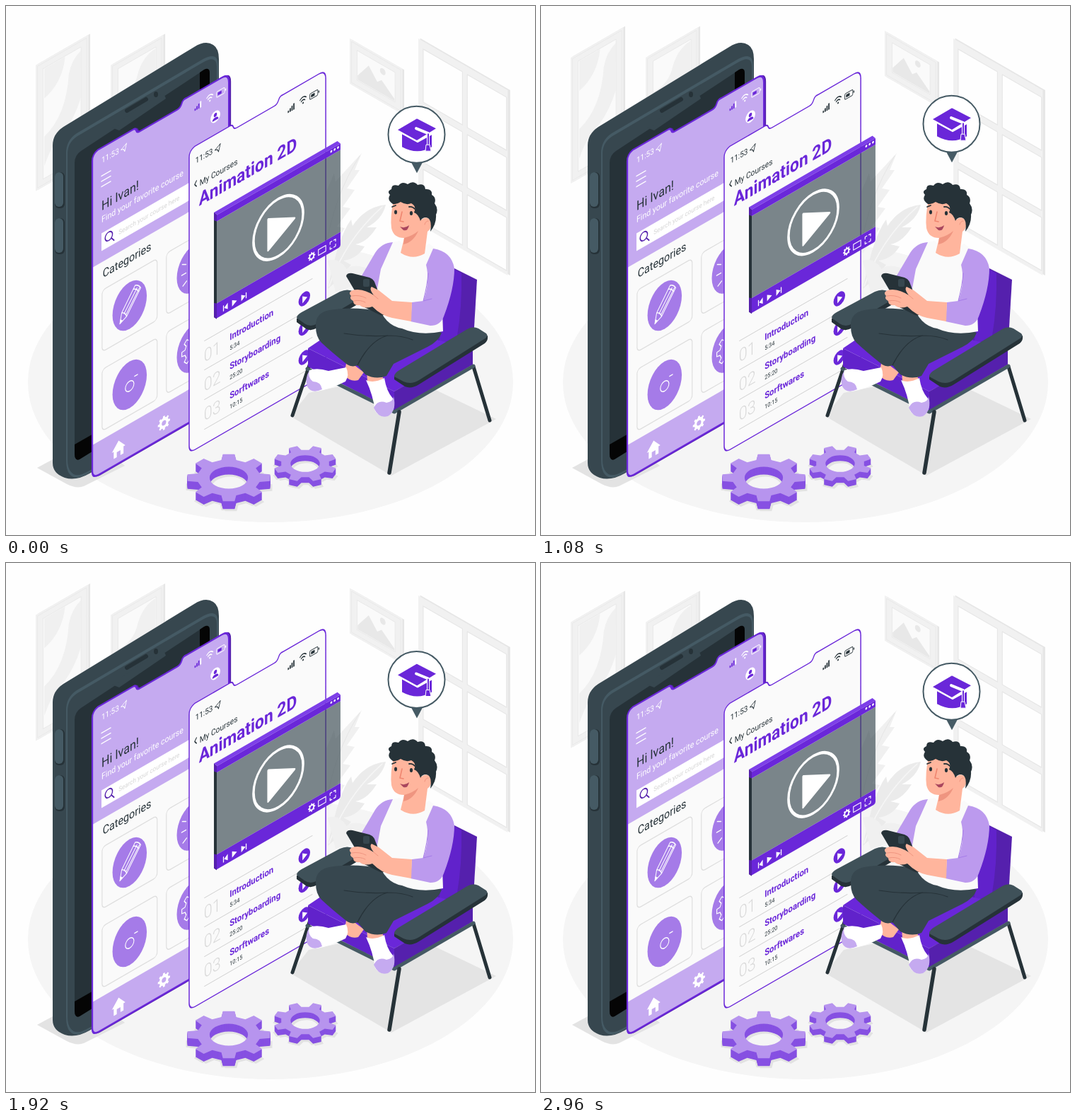
An HTML page for the animation above (3000 ms loop, 748 by 748 pixels).

```html
<!DOCTYPE html>
<html lang="en">
<head>
<meta charset="utf-8">
<style>
  html, body { margin: 0; height: 100%; overflow: hidden; background: #fefefe }
  svg { display: block; width: 100vw; height: 100vh; font-family: Roboto, Inter, sans-serif }
  .line { fill: none; stroke-linecap: round; stroke-linejoin: round }
  .b { font-weight: 700 }
</style>
</head>
<body>
<svg id="stage" viewBox="0 0 748 748"></svg>
<script>
const P = '#6a27d9', LILAC = '#c5aaf0', MID = '#a57be8', DEEP = '#5520ad', SLEEVE = '#bc9aee',
  SLATE = '#37474f', DARK = '#263238', STEEL = '#455a64', SKIN = '#ffb59d', PAPER = '#fafafa';

// Shape helpers
const path = (d, fill, more = '') => `<path d="${d}" fill="${fill}" ${more}/>`;
const line = (d, color, w = 1) => `<path class="line" d="${d}" stroke="${color}" stroke-width="${w}"/>`;
const rect = (x, y, w, h, fill, more = '') =>
  `<rect x="${x}" y="${y}" width="${w}" height="${h}" fill="${fill}" ${more}/>`;
const oval = (x, y, rx, ry, fill, more = '') =>
  `<ellipse cx="${x}" cy="${y}" rx="${rx}" ry="${ry}" fill="${fill}" ${more}/>`;
const text = (x, y, size, fill, s, more = '') =>
  `<text x="${x}" y="${y}" font-size="${size}" fill="${fill}" ${more}>${s}</text>`;
// Wall planes: rising to the right, or falling to the right
const rise = (x, y, s) => `<g transform="matrix(.866 -.5 0 1 ${x} ${y})">${s}</g>`;
const fall = (x, y, s) => `<g transform="matrix(.866 .5 0 1 ${x} ${y})">${s}</g>`;
const part = (id, s) => `<g id="${id}">${s}</g>`;

function gearPath(cx, cy, r, n, hole, squash = 1, turn = 0) {
  const pts = [];
  for (let i = 0; i < n; i++)
    for (const [a, k] of [[-.3, .76], [-.18, 1], [.18, 1], [.3, .76]]) {
      const t = (i + a) / n * 2 * Math.PI + turn;
      pts.push(`${(cx + r * k * Math.cos(t)).toFixed(1)} ${(cy + r * k * squash * Math.sin(t)).toFixed(1)}`);
    }
  const h = r * hole, hy = h * squash;
  return `M${pts.join('L')}ZM${cx - h} ${cy}a${h} ${hy} 0 1 0 ${2 * h} 0a${h} ${hy} 0 1 0 ${-2 * h} 0Z`;
}

function cog(cx, cy, r, depth, turn) {
  const d = gearPath(cx, cy, r, 8, .46, .57, turn);
  const at = (dx, dy, fill) => path(d, fill, `fill-rule="evenodd" transform="translate(${dx} ${dy})"`);
  let s = at(3, depth + 3, '#e2e2e2') + at(-2, depth + 2, '#e2e2e2');
  for (let y = depth; y > 0; y--) s += at(0, y, '#8650e2');
  return s + at(0, 0, '#b794ee');
}

const cardPath = h => `M0 12Q0 3 9 1H67q4 0 5 4t6 4H139q5 0 7-5t7-4H212Q223 0 223 12V${h - 12}` +
  `Q223 ${h} 211 ${h}H10Q0 ${h} 0 ${h - 10}Z`;

function status(x, y, c, c2) {
  let s = '';
  for (let i = 0; i < 4; i++) s += rect(x - 6 + i * 3, y + 2 - i * 2, 2, 3 + i * 2, i < 3 ? c2 : c);
  s += line(`M${x + 14} ${y - 3}q5 -5 10 0M${x + 16} ${y}q3 -3 6 0`, c, 1.5) + oval(x + 19, y + 3, 1.2, 1.2, c);
  return s + rect(x + 30, y - 4, 13, 8, 'none', `rx="1.5" stroke="${c}"`) +
    rect(x + 32, y - 2, 6, 4, c2) + rect(x + 44, y - 1.5, 1.5, 3, c);
}
const clock = (x, y, c) => text(x, y, 11.5, c, '11:53') +
  line(`M${x + 32} ${y - 3}l9 -5l-3 10l-2 -4Z`, c);

const frame = (w, h, art) => rect(3, 0, w, h, '#e6e6e6') + rect(0, 0, w, h, '#f1f1f1') +
  rect(3, 3, w - 6, h - 6, 'none', 'stroke="#e9e9e9"') +
  rect(12, 11, w - 24, h - 22, PAPER, 'stroke="#e8e8e8"') + art;

function room() {
  let panes = '';
  for (const x of [8, 80]) for (const y of [11, 96, 181])
    panes += rect(x, y, 64, 75, '#fefefe', 'stroke="#e6e6e6" stroke-width="1.3"');
  return oval(374, 532, 343, 198, '#f5f5f5') +
    fall(583, 46, rect(3, -2, 147, 262, '#e6e6e6') + rect(0, 0, 146, 262, '#f1f1f1') + panes) +
    part('pictures',
      rise(42, 84, frame(86, 178,
        path('M14 12H48Q44 46 14 54Z M14 108Q50 96 54 40Q58 22 74 16V82Q64 106 46 118Q26 124 14 150Z', '#f0f0f0'))) +
      rise(148, 84, frame(86, 130, path('M13 80V55Q38 56 44 35Q52 14 73 13V66Q50 62 46 85Z', '#f0f0f0'))) +
      fall(486, 46, frame(86, 64,
        path('M13 52V46L31 23L45 39L52 33L73 49V52Z', '#e8e8e8') + oval(54, 20, 4.5, 4.5, '#e8e8e8'))));
}

const plant = () =>
  path('M448 345L453 262L464 236L466 248L503 208L493 232L500 232L482 258L493 260L476 284L487 286L468 312L479 314L455 350Z', '#f0f0f0') +
  line('M452 344Q463 270 500 212', '#e6e6e6') +
  path('M455 400Q470 325 488 302L490 311Q508 284 537 281Q532 302 510 313H524Q511 334 494 337L507 340Q496 358 477 360L488 366Q472 386 455 400Z', '#ebebeb') +
  line('M457 396Q480 330 532 284', '#f6f6f6', 1.5) +
  path('M455 360Q470 355 482 372Q490 362 520 374Q500 396 466 404Z', '#f0f0f0');

function phone() {
  return path('M44 653L120 612L168 650L110 679Q100 683 86 676Z', '#e3e3e3') +
    path('M66 197Q66 181 81 171L266 58Q282 48 293 55Q301 60 301 75V560L118 661Q99 672 83 667Q66 661 66 646Z', SLATE) +
    path('M85 208Q85 190 100 180L277 76Q300 63 300 84V560L116 661Q98 672 90 662Q85 656 85 642Z', STEEL) +
    path('M87 209Q87 193 101 184L278 80Q298 68 298 86V560L116 658Q99 668 92 659Q87 653 87 642Z', SLATE) +
    path('M97 222Q97 211 106 205L279 91Q288 85 288 95V540L125 628L104 641Q97 644 97 633Z', DARK) +
    path('M274 94L280 90Q288 86 288 95V130H274Z M97 620L125 604V628L104 641Q97 644 97 633Z', '#050505') +
    path('M150 172Q161 170 165 160L214 128Q224 122 226 131L160 176Z', SLATE) +
    line('M171 148L198 132', DARK, 6) + oval(212, 125, 3, 4, DARK) +
    [235, 300].map(y => rect(69, y, 14, 51, DARK, 'rx="6"') + rect(69, y, 12, 49, STEEL, 'rx="6"')).join('');
}

function homeCard() {
  const shape = cardPath(461);
  let s = path(shape, DEEP, `stroke="${DEEP}" stroke-width="2" transform="translate(2.500 1)"`) +
    path(shape, PAPER) +
    `<clipPath id="home"><path d="${shape}"/></clipPath><g clip-path="url(#home)">` +
    rect(0, 0, 223, 163, LILAC) + rect(0, 414, 223, 47, LILAC) + '</g>' +
    line(shape, P, 2.6) + clock(15, 23, '#fff') + status(173, 20, '#fff', P) +
    line('M15 41h15M15 48.500h15M15 56h15', '#fff', 1.5) +
    oval(201, 50, 8, 8, '#fff') + oval(201, 47.500, 2.6, 2.8, P) + path('M196 55q0 -4 5 -4t5 4Z', P) +
    text(15, 90, 18.5, DARK, 'Hi Ivan!') +
    text(15, 107, 12.2, '#fff', 'Find your favorite course') +
    rect(15, 122, 190, 25, '#fff') + text(43, 138, 9.3, '#d5d5d5', 'Search your course here') +
    oval(27, 132, 6, 6, 'none', `stroke="${DEEP}" stroke-width="1.7"`) + line('M31.500 137l4 5', DEEP, 1.7) +
    text(17, 186, 16.5, DARK, 'Categories');
  for (const x of [16, 121]) for (const y of [203, 315])
    s += rect(x, y, 90, 87, PAPER, 'rx="6" stroke="#dedede" stroke-width="1.3"') + oval(x + 45, y + 44, 28, 33, MID);
  s += line('M45 265l3 -14l22 -28q6 2 9 8l-23 29ZM48 251q6 2 8 9M52 254l21 -26M55 257l22 -27M67 227q6 2 9 8', '#fff', 1.3) +
    path('M45 265l1 -6l4 4Z', '#fff') +
    oval(61, 361, 7, 7, 'none', 'stroke="#fff" stroke-width="1.3"') + line('M69 351h5', '#fff', 1.3) +
    line('M147 232l6 3M146 247h7M148 263l6 -4', '#fff', 1.5) +
    line(gearPath(167, 359, 21, 8, .4), '#fff', 1.3) +
    path('M32 441l11 -12l11 12h-3v10h-5v-7h-6v7h-5v-10Z', '#fff') +
    path(gearPath(117, 441, 10, 8, .36), '#fff', 'fill-rule="evenodd"');
  return rise(122, 207, s);
}

function courseCard() {
  let s = path(cardPath(430), PAPER, `stroke="${P}" stroke-width="1.7"`) + clock(10, 26, DARK) +
    status(167, 25, DARK, DARK) + line('M12 51l-3 4l3 4', DARK, 1.3) +
    text(17, 61, 11.8, DARK, 'My Courses') + text(16, 89, 26.3, P, 'Animation 2D', 'class="b"') +
    line('M25 284H201M25 325H201M25 367H201M25 409H201', '#cfcfcf');
  [['Introduction', '5:34'], ['Storyboarding', '25:20'], ['Sorftwares', '10:15']].forEach(([name, time], i) => {
    const y = i * 41.5;
    s += text(24, 314 + y, 25, '#d9d9d9', '0' + (i + 1), 'font-weight="300"') +
      text(66, 304 + y, 13.1, P, name, 'class="b"') + text(66, 318 + y, 8.5, DARK, time) +
      oval(188, 306 + y, 9.5, 9.5, P) + path(`M185 ${301 + y}l8 5l-8 5Z`, '#fff');
  });
  return rise(259, 202, s);
}

function video() {
  const w = '#fff';
  return part('video', rise(298, 296,
    path('M-4.600 -6L0 0V147L-4.600 142Z', DARK) + path('M-4.600 -6H197L202 0H0Z', '#7d3fe8') +
    path('M-4.600 -6L0 0V9L-4.600 5Z M-4.600 122L0 125V147L-4.600 142Z', DEEP) +
    rect(0, 9, 202, 116, SLATE, 'opacity=".65"') + rect(0, 0, 202, 9, P) +
    path('M0 125H202V143Q202 146 199 146H0Z', P) +
    [187, 192.500, 198].map(x => oval(x, 3.5, 1.6, 1.6, w)).join('') +
    oval(100.5, 68, 40.5, 40.5, 'none', 'stroke="#fff" stroke-width="4"') +
    path('M84 48L127 68L84 92Z', w, 'stroke="#fff" stroke-width="3" stroke-linejoin="round"') +
    path('M18 133v9l-6 -4.500Z M25 133l8 4.500l-8 4.500Z M40 133l7 4.500l-7 4.500Z', w) +
    line('M11 134v7M48 134v7', w, 1.5) +
    path(gearPath(155, 136, 6, 8, .4), w, 'fill-rule="evenodd"') +
    rect(166, 132, 12, 8, 'none', 'stroke="#fff" stroke-width="1.2"') +
    line('M185 134v-3h3M191 131h3v3M194 138v3h-3M188 141h-3v-3', w, 1.3)));
}

const bubble = () => part('bubble',
  path('M572 220H590L581 237Z', STEEL) +
  oval(580.5, 182.500, 40, 40, '#fff', `stroke="${STEEL}" stroke-width="2"`) +
  path('M560 182L582 194L602 183V200Q582 212 560 200Z', P) +
  path('M552 176L581 159L610 174L581 192Z', P, 'stroke="#fff" stroke-width="2"') +
  line('M580 174L597 181V204', '#fff', 4) + line('M597 182V198', P, 2) +
  path('M594 197h5l2 9h-8Z', P, 'stroke="#fff"'));

const ARM = '#3f5159';

const chairBack = () =>
  path('M402 580L428 547L560 520L693 584L545 664Z', '#e4e4e4') +
  line('M430 505L405 579M661 510L684 586', DARK, 5) +
  path('M634 371L666 387L659 504L600 525L610 440Z', DEEP) +
  path('M632 371L644 378Q645 425 638 466L612 480Q620 400 632 371Z', '#6122cb') +
  path('M427 484L470 455L600 470L660 484L549 545Z', P) +
  path('M427 484L549 545V572L427 510Z', '#6122cb') + path('M549 545L660 482V507L549 572Z', DEEP) +
  path('M411 442V447L425 457Q432 460 440 455L502 419V411Z', DARK) +
  path('M411 441Q411 437 418 433L472 404Q483 399 492 404L502 412L440 449Q431 455 422 449Z', ARM) +
  line('M426 513L549 574L661 509', STEEL, 5) + line('M556 574L542 660', DARK, 5.5);

const chairArm = () =>
  path('M549 523V528L564 538Q573 542 584 535L677 477Q682 473 681 466Z', DARK) +
  path('M549 524Q549 519 556 515L652 457Q660 452 668 456L679 463Q683 467 676 471L584 529Q573 536 562 531Z', ARM);

const person = () =>
  // Feet
  path('M482 500L506 518L498 529Q487 532 478 522Z M510 515L532 520L534 533L511 531Z', SKIN) +
  path('M429 515Q440 511 456 516L481 511Q486 522 480 531Q460 541 440 545Q426 544 425 531Z', '#fff') +
  path('M429 515Q426 525 434 531Q445 531 447 542Q432 549 426 538Q422 527 429 515Z', LILAC) +
  path('M509 529Q520 534 535 526Q538 545 547 555Q552 570 542 578Q530 584 522 573Q519 550 509 529Z', '#fff') +
  path('M520 568Q526 556 538 561Q548 559 548 552Q553 572 540 580Q527 584 520 568Z', LILAC) +
  // Trousers
  path('M438 453Q437 434 457 430Q484 425 520 430L560 440L616 462Q612 474 596 482L548 506L538 523Q523 529 508 521L497 508Q488 512 480 505Q460 489 446 476Q438 468 438 453Z', SLATE) +
  line('M478 463Q510 468 540 466Q515 472 497 508M540 466Q560 466 575 472', DARK, 1.2) +
  // Shirt
  path('M532 337L557 332Q575 357 598 336L614 348L618 460Q585 467 560 456Q535 452 525 420Z', PAPER) +
  path('M547 334Q531 335 522 349L499 388Q510 402 524 404L530 372Z', SLEEVE) +
  path('M604 343Q630 347 634 371Q634 400 619 439Q614 452 600 452L572 446L574 419L590 417Q600 390 594 366Z', SLEEVE) +
  line('M602 414L590 417Q596 394 597 378', MID, 1) +
  // Head
  path('M548 274Q543 298 545 314Q548 328 563 328L558 349Q575 360 592 350L596 319Q604 313 600 303Q594 296 588 302Q584 287 580 278Q565 270 548 274Z', SKIN) +
  path('M563 328Q575 325 583 318Q576 334 562 337Z', '#ef9580') +
  path('M547 280Q538 274 543 267Q538 262 545 259Q545 251 555 254Q560 247 568 252Q576 246 582 253Q592 250 593 259Q603 258 602 267Q609 271 606 279Q612 287 608 295Q609 308 600 319Q603 300 594 299Q588 299 586 304Q583 294 577 292Q581 283 573 279Q566 282 558 277Q552 281 547 280Z', DARK) +
  oval(594, 307, 6, 7, SKIN) + line('M592 309q1 -5 5 -5', '#ef9580') +
  oval(551, 291.500, 2, 3, DARK) + oval(573, 293, 2.1, 3, DARK) +
  line('M546 284l5 -2M570 284q5 -1 8 3', DARK, 1.8) + line('M560 291l-3 13l5 1', '#ef8670', 1.6) +
  path('M557 312Q564 315 570 310Q568 319 562 317Z', '#a9465e') +
  // Handset and hands
  path('M481 382Q482 377 490 378L514 384Q519 386 521 390L537 432Q536 439 529 437L507 426Z', DARK) +
  rect(505, 386, 9, 11, SLATE, 'rx="2"') +
  path('M574 419L546 417L527 402L517 397Q513 400 520 409Q503 398 490 402Q483 405 488 410Q485 414 491 417Q491 424 500 423Q507 429 518 425Q531 438 546 441L573 446Z', SKIN) +
  line('M489 410Q500 408 509 413M492 417Q501 415 508 419M520 409L526 414', '#ef9580', 1);

stage.innerHTML = room() + plant() + phone() + homeCard() + courseCard() + video() +
  chairBack() + person() + chairArm() + bubble() + cog(315, 667, 59, 11, 0) + cog(423, 647, 45, 8, Math.PI / 8);

const parts = [['pictures', 15, 3000], ['video', 15, 1500], ['bubble', 30, 1500]]
  .map(([id, lift, span]) => [document.getElementById(id), lift, span]);

function draw(now) {
  // Linear bobbing, held at 24 steps per second
  const t = (Math.floor((now % 3000 + 4) * .024) % 72 + .5) / .024;
  for (const [el, lift, span] of parts) {
    const k = t % span / span;
    el.setAttribute('transform', `translate(0 ${-lift * (1 - Math.abs(1 - 2 * k))})`);
  }
  requestAnimationFrame(draw);
}
draw(performance.now());
</script>
</body>
</html>
```
